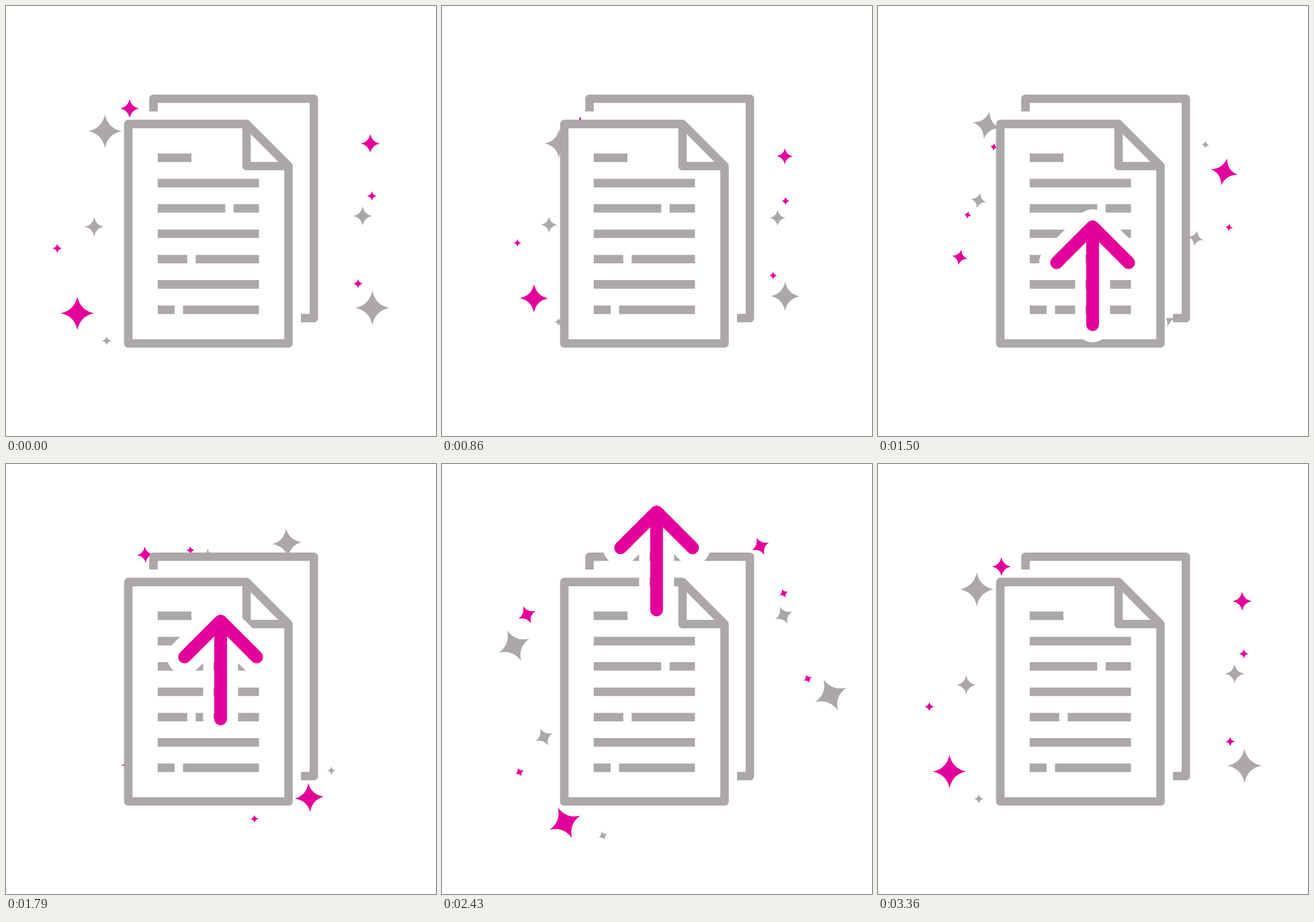
An HTML page that plays this animation: 640x640 px, repeating every 3.43 s.

```html
<!DOCTYPE html>
<html lang="en">
<head>
<meta charset="utf-8">
<title>Document upload</title>
<style>
  html, body { margin: 0; width: 100%; height: 100%; overflow: hidden; background: #fff; }
  svg { display: block; width: 100%; height: 100%; }
  .page { fill: #fff; stroke: none; }
  .line { fill: none; stroke: #aca8a8; stroke-width: 12.6; stroke-linejoin: round; }
  .arrow { fill: none; stroke-linecap: round; stroke-linejoin: round; }
</style>
</head>
<body>
<svg viewBox="0 0 640 640">
  <defs>
    <path id="arrowShape" d="M265.8 382.2L319.4 328.6L373 382.2M319.4 328.6V474.6"/>
    <clipPath id="haloClip">
      <path clip-rule="evenodd" d="M0 0H640V640H0ZM308.6 366V474H310.2V366Z"/>
    </clipPath>
  </defs>
  <g id="stars"></g>
  <path class="page" d="M219.5 138H458.2V464.5H219.5Z"/>
  <path class="line" d="M219.5 157V138H458.2V464.5H439"/>
  <path class="page" d="M182 175.6H358L420.5 238.2V502.2H182Z"/>
  <path class="line" d="M182 175.6H358L420.5 238.2V502.2H182ZM358 175.6V238.2H420.5"/>
  <path class="line" id="text"/>
  <g id="arrow">
    <g clip-path="url(#haloClip)">
      <use href="#arrowShape" class="arrow" stroke="#fff" stroke-width="52"/>
    </g>
    <use href="#arrowShape" class="arrow" stroke="#e4009a" stroke-width="19"/>
  </g>
</svg>
<script>
  const LOOP = 3430, STEP = LOOP / 48, CENTER = 320;
  const GRAY = '#aca8a8', PINK = '#e4009a';
  const $ = id => document.getElementById(id);

  // x, y, radius, colour
  const stars = [
    [184, 152.5, 14, PINK], [147.3, 186.3, 25, GRAY], [131.3, 328.5, 14, GRAY],
    [76.3, 360.8, 7, PINK], [106.2, 457.3, 25, PINK], [149.8, 498.3, 7, GRAY],
    [542.2, 204.7, 14, PINK], [544.5, 282.8, 7, PINK], [530.8, 312.5, 14, GRAY],
    [524, 413.3, 7, PINK], [545.2, 449.3, 25.5, GRAY]
  ];
  const c = 0.17;
  const starPath = `M0-1Q${c} ${-c} 1 0Q${c} ${c} 0 1Q${-c} ${c}-1 0Q${-c} ${-c} 0-1Z`;
  $('stars').innerHTML = stars.map(([x, y, r, fill]) =>
    `<path d="${starPath}" fill="${fill}" transform="translate(${x} ${y}) scale(${r})"/>`).join('');

  // Each row of text is a list of start and end pairs
  const L = 225.8, R = 376.5;
  const rows = [[L, 276], [L, R], [L, 326.3, 338.8, R], [L, R], [L, 269.8, 282.3, R], [L, R], [L, 251, 263.5, R]];
  $('text').setAttribute('d', rows.map((row, i) => {
    let d = '';
    for (let k = 0; k < row.length; k += 2) d += `M${row[k]} ${225.9 + i * 37.7}H${row[k + 1]}`;
    return d;
  }).join(''));

  const clamp = v => Math.min(1, Math.max(0, v));
  const part = (t, from, to) => clamp((t - from) / (to - from));

  // Eased progress with horizontal handles x1 and x2
  function ease(x, x1, x2) {
    let lo = 0, hi = 1, u = 0.5;
    for (let i = 0; i < 30; i++) {
      u = (lo + hi) / 2;
      const v = 1 - u;
      if (3 * v * v * u * x1 + 3 * v * u * u * x2 + u ** 3 < x) lo = u; else hi = u;
    }
    return u * u * (3 - 2 * u);
  }

  // Smooth curve through [time, value] points
  function curve(pts, t) {
    const last = pts.length - 1;
    if (t <= pts[0][0]) return pts[0][1];
    if (t >= pts[last][0]) return pts[last][1];
    const i = pts.findIndex(p => p[0] > t) - 1;
    const slope = k => {
      const a = pts[Math.max(0, k - 1)], b = pts[Math.min(last, k + 1)];
      return (b[1] - a[1]) / (b[0] - a[0]);
    };
    const [t0, y0] = pts[i], [t1, y1] = pts[i + 1];
    const h = t1 - t0, u = (t - t0) / h, v = 1 - u;
    return v * v * (1 + 2 * u) * y0 + u * u * (3 - 2 * u) * y1
      + h * u * v * (v * slope(i) - u * slope(i + 1));
  }

  const rise = [[1000, 159], [1140, 121], [1500, 0], [2070, -182], [2430, -257.5], [2710, -302], [2860, -322]];

  function draw(t) {
    const angle = 360 * ease(part(t, 800, LOOP), 0.329, 0.0157);
    const shrink = 1 - (1 - part(t, 0, 1470)) ** 2;
    const grow = ease(part(t, 1470, 2430), 0.333, 0.667);
    const scale = 1 - 0.18 * (shrink - grow);
    $('stars').setAttribute('transform',
      `translate(${CENTER} ${CENTER}) rotate(${angle}) scale(${scale}) translate(${-CENTER} ${-CENTER})`);

    const fadeOut = t < 2712 ? 1 - 0.83 * part(t, 2435, 2712) : 0.17 * (1 - part(t, 2712, 2815));
    $('arrow').setAttribute('transform', `translate(0 ${curve(rise, t)})`);
    $('arrow').setAttribute('opacity', part(t, 1030, 1380) * fadeOut);
  }

  const start = performance.now();
  function tick() {
    const t = (performance.now() - start) % LOOP;
    draw(Math.floor((t + 6) / STEP) % 48 * STEP);
    requestAnimationFrame(tick);
  }
  tick();
</script>
</body>
</html>
```
